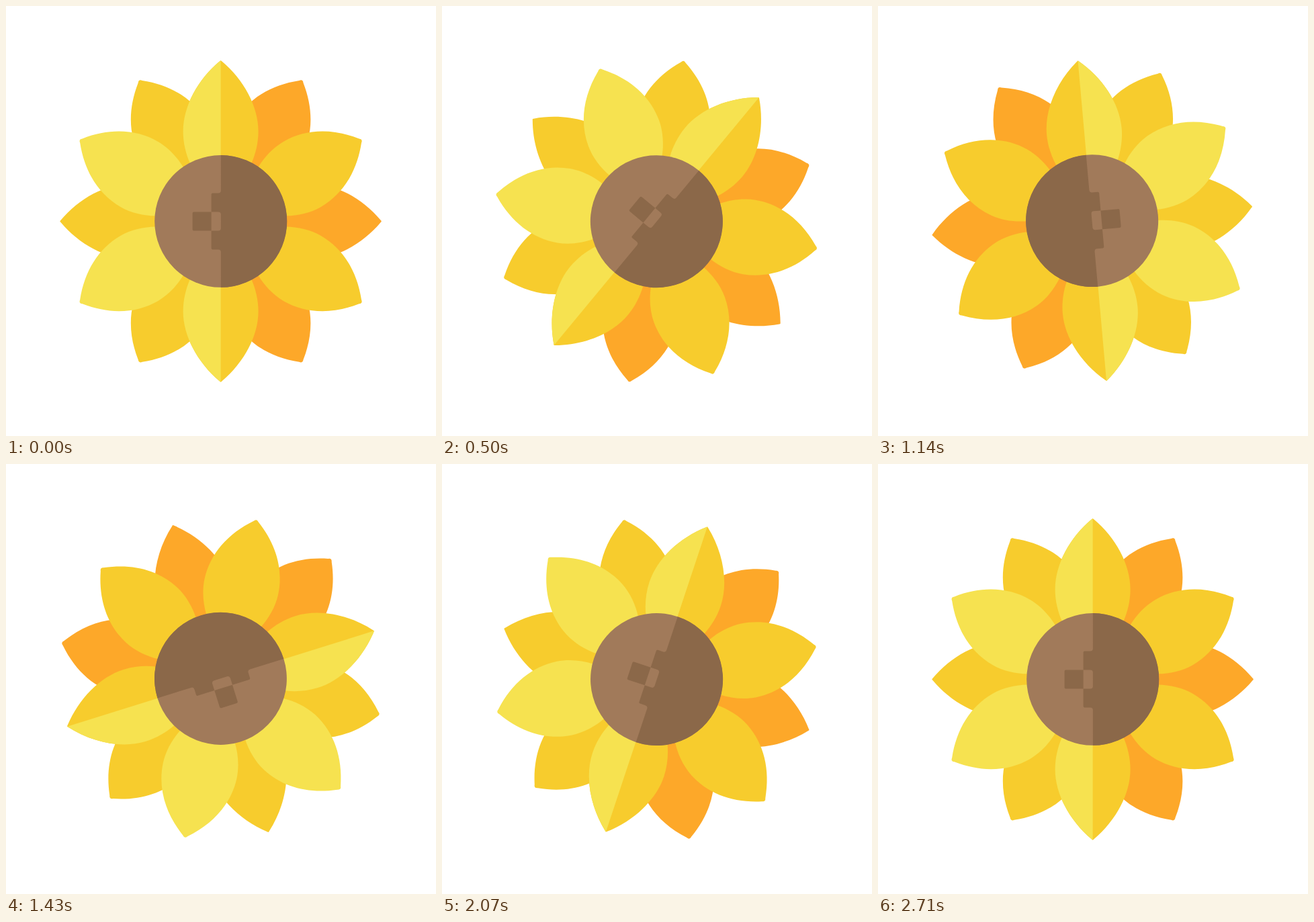
These frames come from a looping animation (640 px wide and 640 px high, 4.78 s). An HTML page:

```html
<!DOCTYPE html>
<html lang="en">
<head>
<meta charset="utf-8">
<title>Turning sunflower</title>
<style>
  html, body { margin: 0; height: 100%; overflow: hidden; background: #fff; }
  svg { display: block; width: 100%; height: 100%; }
</style>
</head>
<body>
<svg viewBox="0 0 640 640">
  <g id="flower">
    <g id="petals"></g>
    <circle r="98.4" fill="#a17a5a"/>
    <g fill="#8b6849">
      <path d="M.3-98.4V-46q0 4-4 4H-12q-2 0-2 2V-14H-3.7q4 0 4 4V10q0 4-4 4H-14V40q0 2 2 2H-3.7q4 0 4 4V98.4A98.4 98.4 0 0 0 .3-98.4Z"/>
      <path d="M-14-14H-40q-2 0-2 2V12q0 2 2 2H-14Z"/>
    </g>
  </g>
</svg>
<script>
const LIGHT = '#f6e250', YELLOW = '#f7cc2d', ORANGE = '#fda829';
const FPS = 14, LOOP = 4780;
const flower = document.getElementById('flower');
const petals = document.getElementById('petals');

// Outlines of upright petals around the flower's centre
const SHORT = 'M-1.3-238.3Q0-240 1.3-238.3C34-211 56-171 56-134C56-117 52-101 46-87L0-60L-46-87C-52-101-56-117-56-134C-56-171-34-211-1.3-238.3Z';
const LONG = 'M-3.5-239.8Q0-244.4 3.5-239.8C37-213 56-178 56-140C56-122 50-103 41.5-88L0-60L-41.5-88C-50-103-56-122-56-140C-56-178-37-213-3.5-239.8Z';
const HALF = 'M0-239.2L-1.3-238.3C-34-211-56-171-56-134C-56-117-52-101-46-87L0-60Z';

function petal(shape, angle, color, flip = 1) {
  const p = document.createElementNS('http://www.w3.org/2000/svg', 'path');
  p.setAttribute('d', shape);
  p.setAttribute('fill', color);
  p.setAttribute('transform', `rotate(${angle}) scale(${flip} 1)`);
  petals.append(p);
}

for (const a of [30, 90, 150]) {
  const shape = a === 90 ? SHORT : LONG;
  petal(shape, a, ORANGE);
  petal(shape, -a, YELLOW);
}
for (const a of [60, 120]) {
  petal(LONG, a, YELLOW);
  petal(LONG, -a, LIGHT);
}
petal(SHORT, 0, YELLOW);
petal(HALF, 0, LIGHT);
petal(SHORT, 180, YELLOW);
petal(HALF, 180, LIGHT, -1);

// Turn with overshoot: [step, degrees, degrees per step]
const KEYS = [
  [0, 0, 1.3], [7, 39.6, 9.9], [11, 89.4, 15.2], [16, 174.9, 18.9],
  [24, 324.7, 16], [29, 378.4, 4.4], [38, 360, 0]
];

function angleAt(n) {
  const i = KEYS.findIndex(k => n < k[0]);
  if (i < 0) return 0;
  const [n0, a0, v0] = KEYS[i - 1], [n1, a1, v1] = KEYS[i];
  const h = n1 - n0, u = (n - n0) / h, w = 1 - u;
  return a0 * w * w * (1 + 2 * u) + a1 * u * u * (1 + 2 * w) + h * u * w * (v0 * w - v1 * u);
}

const start = performance.now();
function draw(now) {
  const t = Math.max(0, now - start) % LOOP;
  const step = Math.floor((t + 5) * FPS / 1000);
  flower.setAttribute('transform', `translate(319.2 320) rotate(${angleAt(step)}) translate(.4 .4)`);
  requestAnimationFrame(draw);
}
draw(start);
</script>
</body>
</html>
```
